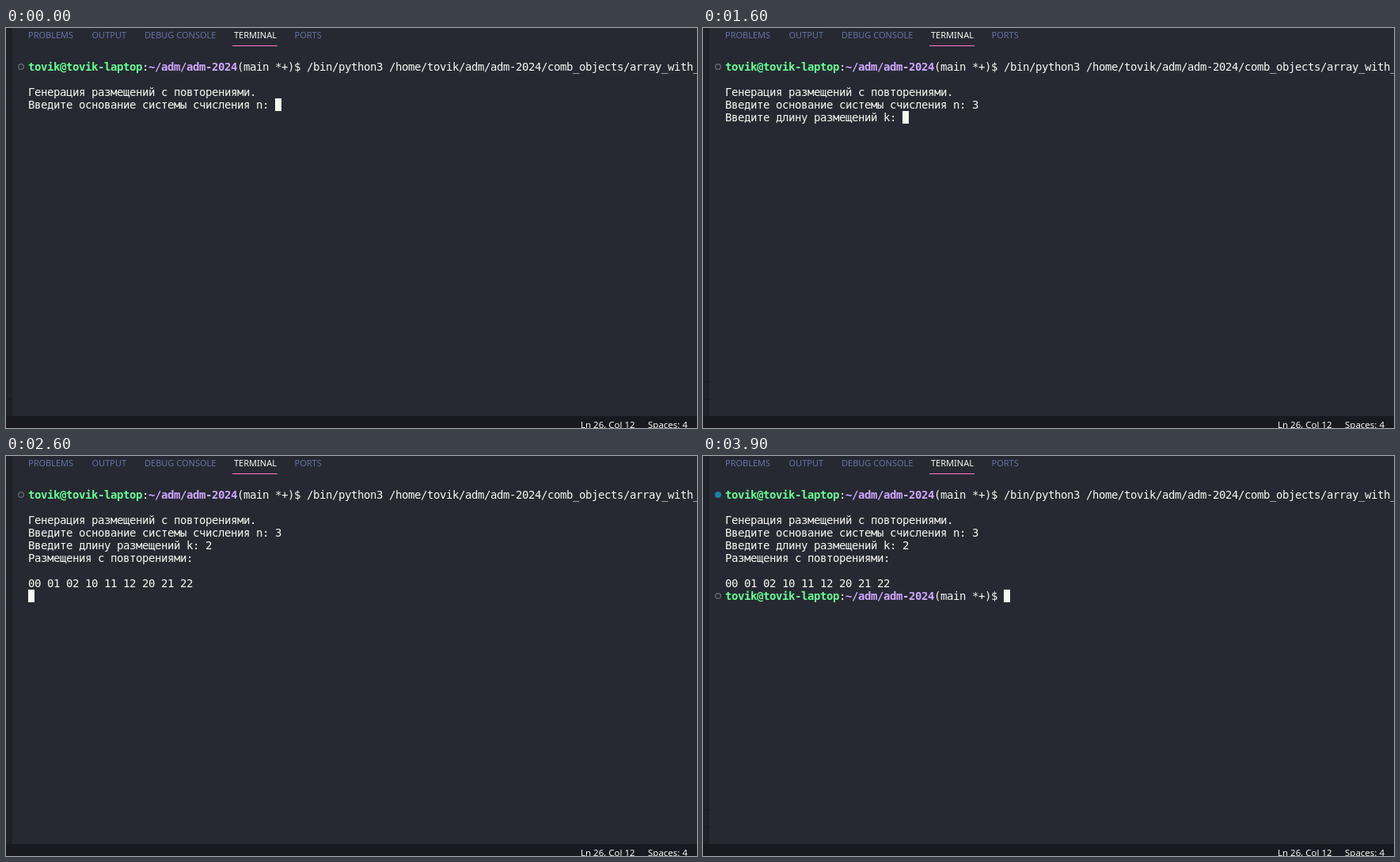
Write an HTML page with a canvas that moves like this. It is 873 px wide and 506 px high and loops after 7300 ms.

```html
<!DOCTYPE html>
<html lang="ru">
<head>
<meta charset="utf-8">
<title>Terminal</title>
<style>
  html, body { margin: 0; width: 100%; height: 100%; overflow: hidden; background: #272932; }
  canvas { display: block; }
</style>
</head>
<body>
<canvas id="stage" width="873" height="506"></canvas>
<script>
const ctx = document.getElementById('stage').getContext('2d');
const LOOP = 7300;
const CELL = 8, LINE = 16, LEFT = 28, TOP = 41;
const COLOR = {
  panel: '#272932', side: '#1f2129', status: '#191a21', text: '#f8f8f2', tab: '#6272a4',
  accent: '#ff79c6', user: '#69ff94', path: '#cfa8ff', ring: '#62656e', done: '#1b81a8'
};
const MONO = '14px "DejaVu Sans Mono", monospace';
const UI = '"Noto Sans", sans-serif';
const USER = 'tovik';
const COMMAND = `/bin/python3 /home/${USER}/adm/adm-2024/comb_objects/array_with_`;
const TABS = [['PROBLEMS', 28], ['OUTPUT', 108.5], ['DEBUG CONSOLE', 175], ['TERMINAL', 288], ['PORTS', 364.5]];

// Moments of each terminal event, in ms
const AT = { typeN: 800, enterN: 1600, typeK: 2300, enterK: 2500, exit: 2700 };

function rect(x, y, w, h, color) {
  ctx.fillStyle = color;
  ctx.fillRect(x, y, w, h);
}

function label(text, x, y, size, color) {
  ctx.font = `${size}px ${UI}`;
  ctx.fillStyle = color;
  ctx.fillText(text, x, y);
}

// Writes text on the character grid and returns the next free column
function write(text, row, col = 0, color = COLOR.text, bold = false) {
  ctx.font = (bold ? 'bold ' : '') + MONO;
  ctx.fillStyle = color;
  for (const char of text) ctx.fillText(char, LEFT + CELL * col++, TOP + LINE * row + 13);
  return col;
}

function prompt(row) {
  let col = write(`${USER}@${USER}-laptop`, row, 0, COLOR.user, true);
  col = write(':', row, col);
  col = write('~/adm/adm-2024', row, col, COLOR.path, true);
  return write('(main *+)$ ', row, col);
}

function marker(row, done) {
  ctx.beginPath();
  ctx.arc(19, TOP + LINE * row + 8, done ? 4 : 3.3, 0, 2 * Math.PI);
  ctx.fillStyle = COLOR.done;
  ctx.strokeStyle = COLOR.ring;
  ctx.lineWidth = 1.4;
  done ? ctx.fill() : ctx.stroke();
}

function drawFrame() {
  rect(0, 0, 873, 506, COLOR.panel);
  rect(0, 0, 8, 491, COLOR.side);
  rect(0, 447, 8, 1, COLOR.status);
  rect(0, 469, 8, 1, COLOR.status);
  rect(0, 491, 873, 15, COLOR.status);
  for (const [name, x] of TABS) label(name, x, 13, 11, name === 'TERMINAL' ? COLOR.text : COLOR.tab);
  rect(286, 22, 57, 1, COLOR.accent);
  label('Ln 26, Col 12', 726, 506, 11.5, COLOR.text);
  label('Spaces: 4', 811, 506, 11.5, COLOR.text);
}

function drawTerminal(t) {
  marker(0, t >= AT.exit);
  write(COMMAND, 0, prompt(0));
  write('Генерация размещений с повторениями.', 2);

  let row = 3;
  let col = write('Введите основание системы счисления n: ' + (t >= AT.typeN ? '3' : ''), row);
  if (t >= AT.enterN) {
    row = 4;
    col = write('Введите длину размещений k: ' + (t >= AT.typeK ? '2' : ''), row);
  }
  if (t >= AT.enterK) {
    write('Размещения с повторениями:', 5);
    write('00 01 02 10 11 12 20 21 22', 7);
    row = 8;
    col = 0;
  }
  if (t >= AT.exit) {
    marker(row, false);
    col = prompt(row);
  }
  rect(LEFT + CELL * col, TOP + LINE * row, CELL, LINE, COLOR.text);
}

const start = performance.now();
function render() {
  drawFrame();
  drawTerminal((performance.now() - start) % LOOP);
  requestAnimationFrame(render);
}
render();
</script>
</body>
</html>
```
